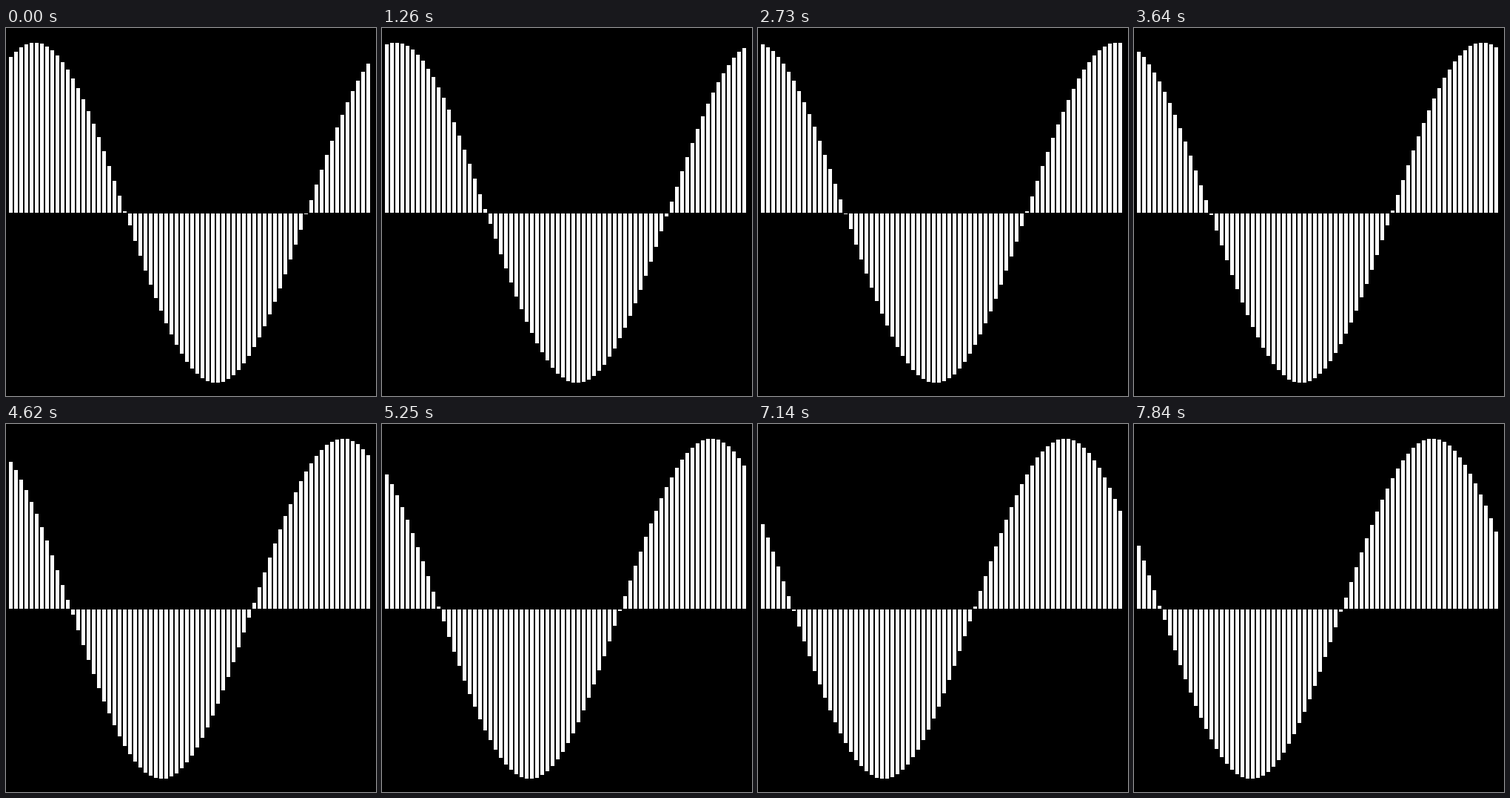
Animation, 500 px wide and 496 px high, one loop 7910 ms. Source, as an HTML page with a canvas:

```html
<!DOCTYPE html>
<html lang="en">
<head>
<meta charset="utf-8">
<title>Sine bars</title>
<style>
  html, body { margin: 0; width: 100%; height: 100%; overflow: hidden; background: #000; }
  canvas { display: block; }
</style>
</head>
<body>
<canvas id="stage" width="500" height="496"></canvas>
<script>
const ctx = document.getElementById('stage').getContext('2d');

const STEP_MS = 70, STEPS = 113;
const BARS = 70, LEFT = 4, PITCH = 7, BAR_W = 5;
const BASE = 249, AMP = 230;
const START = 22.137;   // falling zero crossing at time 0, in bars
const SPEED = 0.15985;  // bars per step, leftwards
const SNAP = 0.0018;    // lets a crest reach its full pixel

function draw(step) {
  ctx.fillStyle = '#000';
  ctx.fillRect(0, 0, 500, 496);
  ctx.fillStyle = '#fff';
  const zero = START - SPEED * step;
  for (let i = 0; i < BARS; i++) {
    const y = BASE + AMP * Math.sin((i - zero) * 2 * Math.PI / BARS);
    const edge = Math.floor(y + SNAP);
    // each bar fills the rows strictly between the base row and its edge row
    const top = Math.min(edge, BASE) + 1;
    const bottom = Math.max(edge, BASE);
    if (bottom > top) ctx.fillRect(LEFT + i * PITCH, top, BAR_W, bottom - top);
  }
}

const begin = performance.now();
function tick() {
  const elapsed = performance.now() - begin;
  draw(Math.floor(elapsed / STEP_MS) % STEPS);
  requestAnimationFrame(tick);
}
tick();
</script>
</body>
</html>
```
